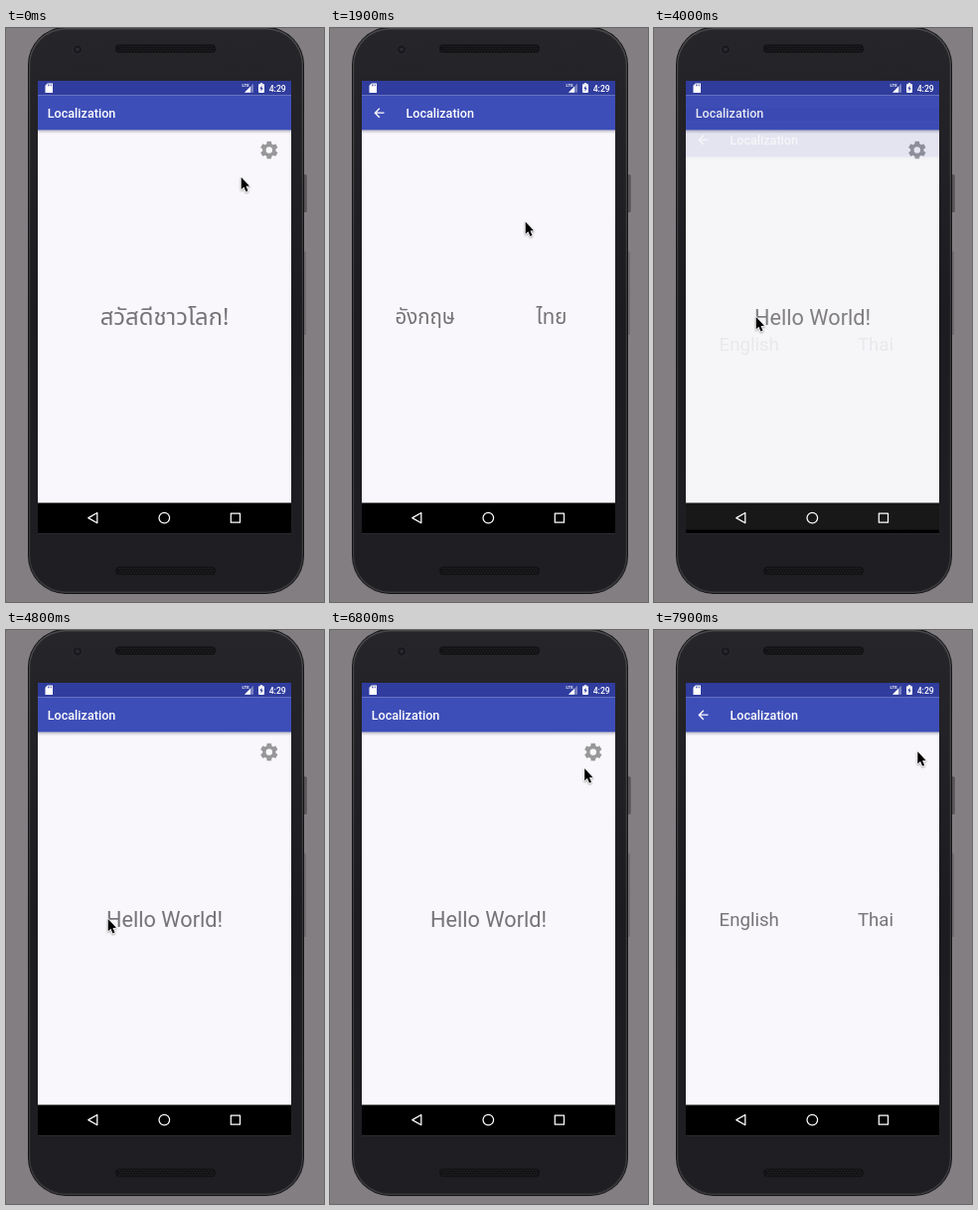
Write an HTML page with a canvas that moves like this. It is 320x576 px and loops after 8000 ms.

```html
<!DOCTYPE html>
<html lang="en">
<head>
<meta charset="utf-8">
<title>Localization</title>
<style>
  html, body { margin: 0; width: 100%; height: 100%; overflow: hidden; background: #827e81; }
  canvas { display: block; width: 320px; height: 576px; }
</style>
</head>
<body>
<canvas id="stage"></canvas>
<script>
const W = 320, H = 576, LOOP = 8000, STEP = 100;
const SCREEN = { x: 32, y: 53, w: 255, h: 454.5 };
const NAV_TOP = 476.5;
const SANS = 'Roboto, "Noto Sans Thai", "Noto Sans", sans-serif';
const THAI = '"Noto Sans Thai Looped", "Noto Sans Thai", "Noto Sans", sans-serif';
const WORDS = {
  th: { hello: 'สวัสดีชาวโลก!', english: 'อังกฤษ', thai: 'ไทย', font: THAI, scale: 1.1 },
  en: { hello: 'Hello World!', english: 'English', thai: 'Thai', font: SANS, scale: 1 }
};
// Pointer tip: time, x, y
const POINTER = [
  [0, 236, 148.8], [100, 238, 147], [300, 252, 135], [600, 262.8, 126],
  [1600, 262.8, 126], [1800, 232, 154], [2000, 160, 233], [2200, 107, 286], [2300, 102, 289],
  [5000, 102, 289], [5200, 106, 295], [5500, 126.5, 301],
  [5800, 165, 302], [6200, 206, 297], [6500, 206, 297],
  [6600, 216, 262], [6700, 241, 185], [6800, 255.5, 138], [7000, 262, 125], [7200, 264.6, 121]
];
const ratio = Math.max(1, window.devicePixelRatio || 1);

function makeLayer(canvas) {
  canvas.width = W * ratio;
  canvas.height = H * ratio;
  const c = canvas.getContext('2d');
  c.scale(ratio, ratio);
  return c;
}

const ctx = makeLayer(document.getElementById('stage'));
const phone = makeLayer(document.createElement('canvas'));
const layer = makeLayer(document.createElement('canvas'));

function rect(c, color, x, y, w, h) {
  c.fillStyle = color;
  c.fillRect(x, y, w, h);
}

function round(c, color, x, y, w, h, r) {
  c.beginPath();
  c.roundRect(x, y, w, h, r);
  c.fillStyle = color;
  c.fill();
}

function disc(c, color, x, y, r) {
  c.beginPath();
  c.arc(x, y, r, 0, Math.PI * 2);
  c.fillStyle = color;
  c.fill();
}

function poly(c, points) {
  c.beginPath();
  points.forEach(([x, y], i) => i ? c.lineTo(x, y) : c.moveTo(x, y));
  c.closePath();
}

function label(c, text, x, y, font, color, align = 'left') {
  c.font = font;
  c.fillStyle = color;
  c.textAlign = align;
  c.fillText(text, x, y);
}

function vertical(c, y0, y1, ...colors) {
  const g = c.createLinearGradient(0, y0, 0, y1);
  colors.forEach((color, i) => g.addColorStop(i / (colors.length - 1), color));
  return g;
}

function drawSpeaker(c, y) {
  round(c, '#131315', 110, y, 101, 8.5, 4);
  for (let row = 0; row < 3; row++)
    for (let x = 114; x < 208; x += 3)
      disc(c, '#252527', x + row % 2 * 1.5, y + 2 + row * 2.2, 0.7);
}

function drawPhone(c) {
  rect(c, '#827e81', 0, 0, W, H);
  round(c, '#575457', 298, 147, 4.7, 38, 1.5);
  round(c, '#6f6b6e', 298, 224, 4, 84, 1.5);
  round(c, '#151516', 22, -1, 278, 569, 38);
  round(c, vertical(c, 0, 568, '#48474a', '#343336', '#39383b'), 23, 0, 276, 567, 37);
  round(c, vertical(c, 0, 568, '#262529', '#1c1b1f', '#1f1e22'), 24.2, 1.5, 273.5, 564, 36);
  drawSpeaker(c, 16.5);
  drawSpeaker(c, 540.5);
  disc(c, '#2c2b2f', 72, 21.5, 5.3);
  disc(c, '#1a191d', 72, 21.5, 4.3);
  disc(c, '#2b2d36', 72, 21.5, 1.8);
}

function drawGear(c, x, y) {
  const points = [];
  const add = (deg, r) => {
    const a = deg * Math.PI / 180;
    points.push([x + r * Math.cos(a), y + r * Math.sin(a)]);
  };
  for (let deg = -90; deg < 270; deg += 60) {
    add(deg - 22, 6.7);
    add(deg - 14, 9);
    add(deg + 14, 9);
    add(deg + 22, 6.7);
  }
  poly(c, points);
  c.moveTo(x + 3.2, y);
  c.arc(x, y, 3.2, 0, Math.PI * 2);
  c.fillStyle = '#989799';
  c.fill('evenodd');
}

function drawBackArrow(c) {
  c.beginPath();
  c.moveTo(54.5, 85.2);
  c.lineTo(45.6, 85.2);
  c.moveTo(49.8, 80.7);
  c.lineTo(45.3, 85.2);
  c.lineTo(49.8, 89.7);
  c.strokeStyle = '#fff';
  c.lineWidth = 1.3;
  c.stroke();
}

function drawFrame(c, titleX) {
  c.clearRect(0, 0, W, H);
  rect(c, '#f9f7fb', SCREEN.x, SCREEN.y, SCREEN.w, SCREEN.h);
  rect(c, vertical(c, 102, 106, 'rgba(60,60,90,.34)', 'rgba(60,60,90,0)'), SCREEN.x, 102, SCREEN.w, 4);
  rect(c, '#303d9e', SCREEN.x, SCREEN.y, SCREEN.w, 14.5);
  rect(c, '#3e4eb8', SCREEN.x, 67.5, SCREEN.w, 34.8);
  rect(c, '#000', SCREEN.x, NAV_TOP, SCREEN.w, 31);
  label(c, 'Localization', titleX, 89.8, `500 12.6px ${SANS}`, '#fff');
}

function drawHome(c, lang, ripple) {
  const words = WORDS[lang];
  drawFrame(c, 41.7);
  if (ripple) disc(c, 'rgba(0,0,0,.1)', 264.5, 122.5, ripple);
  drawGear(c, 264.8, 122.5);
  label(c, words.hello, 159.6, 298.3, `${21.7 * words.scale}px ${words.font}`, '#757376', 'center');
}

function drawSettings(c, lang) {
  const words = WORDS[lang], font = `${18.6 * words.scale}px ${words.font}`;
  drawFrame(c, 76.4);
  drawBackArrow(c);
  label(c, words.english, 95.7, 296.8, font, '#757376', 'center');
  label(c, words.thai, 223, 296.8, font, '#757376', 'center');
}

function drawSystemIcons(c) {
  // SD card
  poly(c, [[39.5, 57.8], [41.8, 55.5], [47, 55.5], [47, 65], [39.5, 65]]);
  c.fillStyle = '#fff';
  c.fill();
  for (let i = 0; i < 3; i++) rect(c, '#303d9e', 42 + i * 1.5, 56.5, 0.7, 1.8);
  // Signal
  label(c, 'LTE', 237.6, 59.2, `700 4.3px ${SANS}`, '#fff');
  poly(c, [[240, 64.8], [249, 55.8], [249, 64.8]]);
  c.fillStyle = 'rgba(255,255,255,.35)';
  c.fill();
  poly(c, [[240, 64.8], [246, 58.8], [246, 64.8]]);
  c.fillStyle = '#fff';
  c.fill();
  // Battery
  round(c, '#fff', 254, 56.3, 6, 8.6, 0.8);
  rect(c, '#fff', 255.8, 55.2, 2.4, 1.4);
  poly(c, [[257.5, 57.6], [255.4, 61], [256.7, 61], [256.5, 63.8], [258.7, 60.2], [257.4, 60.2]]);
  c.fillStyle = '#303d9e';
  c.fill();
  label(c, '4:29', 281.8, 63.7, `500 8.7px ${SANS}`, '#fff', 'right');
  // Navigation
  c.strokeStyle = '#fff';
  c.lineWidth = 1.25;
  c.lineJoin = 'round';
  poly(c, [[82.8, 491.6], [91.8, 486.5], [91.8, 496.7]]);
  c.stroke();
  c.beginPath();
  c.arc(159.3, 491.6, 5.3, 0, Math.PI * 2);
  c.stroke();
  c.strokeRect(226.3, 487, 9.2, 9.2);
  c.lineJoin = 'miter';
}

function drawPointer(c, x, y) {
  c.save();
  c.translate(x, y);
  poly(c, [[0.7, 1], [0.7, 13.2], [3.4, 10.7], [5.5, 15.4], [7.5, 14.5], [5.5, 9.9], [9, 9.7]]);
  c.lineJoin = 'round';
  c.strokeStyle = '#fff';
  c.lineWidth = 1.6;
  c.shadowColor = 'rgba(0,0,0,.35)';
  c.shadowBlur = 2 * ratio;
  c.shadowOffsetY = ratio;
  c.stroke();
  c.shadowColor = 'transparent';
  c.fillStyle = '#000';
  c.fill();
  c.restore();
}

function pointerAt(t) {
  const next = POINTER.findIndex(p => p[0] > t);
  if (next < 0) return POINTER[POINTER.length - 1].slice(1);
  const [t0, x0, y0] = POINTER[next - 1], [t1, x1, y1] = POINTER[next];
  const k = (t - t0) / (t1 - t0);
  return [x0 + (x1 - x0) * k, y0 + (y1 - y0) * k];
}

const clamp = v => Math.min(1, Math.max(0, v));
const SLIDE = 36;

function opening(ms) {
  return {
    shift: SLIDE * (1 - clamp(ms / 350)) ** 5,
    alpha: 1 - (1 - clamp(ms / 200)) ** 4,
    under: 0.85
  };
}

function closing(ms) {
  return {
    shift: SLIDE * clamp(ms / 250) ** 5,
    alpha: 1 - clamp((ms - 100) / 150),
    under: 0.99
  };
}

// Pose of the settings window over the home window
function settingsAt(t) {
  if (t >= 7621) return opening(t - 7621);
  if (t >= 3764) return closing(t - 3764);
  return opening(t - 1002);
}

function rippleAt(t) {
  const ms = t < 4000 ? t - 900 : t - 7500;
  return ms >= 0 && ms <= 200 ? 10 + ms / 40 : 0;
}

function stamp(source, alpha, shift) {
  ctx.globalAlpha = alpha;
  ctx.drawImage(source.canvas, 0, shift, W, H);
  ctx.globalAlpha = 1;
}

function render(t) {
  const lang = t < 2800 ? 'th' : 'en';
  const top = settingsAt(t);
  stamp(phone, 1, 0);
  ctx.save();
  ctx.beginPath();
  ctx.rect(SCREEN.x, SCREEN.y, SCREEN.w, SCREEN.h);
  ctx.clip();
  rect(ctx, '#000', SCREEN.x, SCREEN.y, SCREEN.w, SCREEN.h);
  if (top.alpha < 1) {
    drawHome(layer, lang, rippleAt(t));
    stamp(layer, top.alpha > 0 ? top.under : 1, 0);
  }
  if (top.alpha > 0) {
    drawSettings(layer, lang);
    stamp(layer, top.alpha, top.shift);
  }
  drawSystemIcons(ctx);
  ctx.restore();
  drawPointer(ctx, ...pointerAt(t));
}

drawPhone(phone);
const start = performance.now();
function tick() {
  const t = (performance.now() - start) % LOOP;
  render(Math.floor(t / STEP) * STEP);
  requestAnimationFrame(tick);
}
tick();
</script>
</body>
</html>
```
